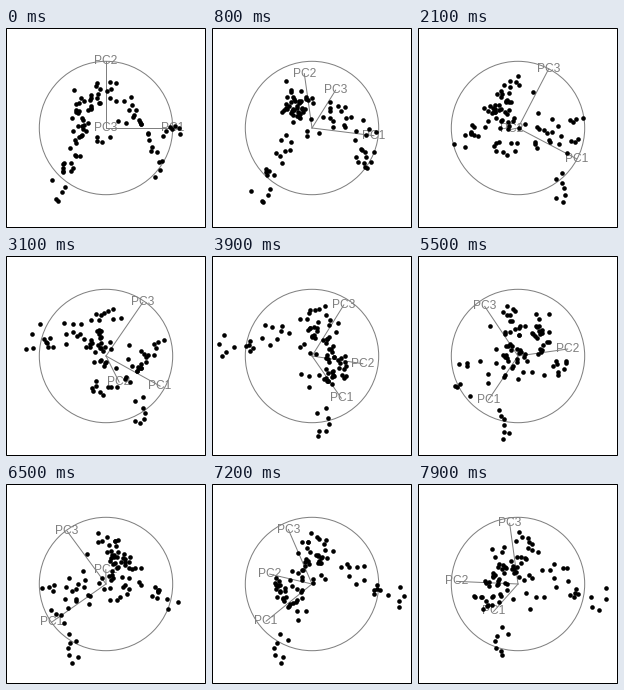
A matplotlib script that plays this animation: 200x200 px, repeating every 8000 ms.

```python
import numpy as np
import matplotlib.pyplot as plt
from matplotlib.animation import FuncAnimation
from matplotlib.patches import Circle, Rectangle

SIZE, DPI = 200, 100
PT = 72 / DPI          # one pixel in points
CENTER, RADIUS = 100, 66.7
FRAMES, INTERVAL = 80, 100
GRAY = "#7f7f7f"

# Tour legs: tilt direction on screen (degrees), tilt angle (rad), steps.
# The view rests for one step between legs.
LEGS = [
    (58, 1.19, 13), (108, 1.20, 13), (224, 0.21, 3), (206, 1.55, 14),
    (158, 1.31, 13), (186, 1.30, 13), (212, 0.35, 4),
]

# The observations follow a horseshoe with a side arm and a sparse core.
HORSESHOE = [
    (-48, -78, -31), (-44, -44, -40), (-36, -36, 2), (-34, -22, 4),
    (-25, -3, 35), (-22, 2, 30), (-34, 16, 14), (-24, 32, 16),
    (-14, 26, 2), (-18, 22, 8), (-4, 45, -24), (14, 37, -17),
    (26, 16, 12), (34, 5, 4), (49, -19, 18), (58, -48, 18),
]
SIDE_ARM = [(58, -9, -20), (73, 1, -48)]
CORE = [(-12, -18, 18), (17, 4, 6)]


def strand(rng, keys, n, spread):
    """n jittered points along a path, equally many on each leg."""
    keys = np.array(keys, float)
    t = np.linspace(0, len(keys) - 1, n)
    path = [np.interp(t, np.arange(len(keys)), k) for k in keys.T]
    jitter = np.clip(rng.normal(size=(n, 3)), -1.8, 1.8)
    return np.column_stack(path) + jitter * spread


def tilt(direction, angle):
    """Rotate the view by an angle, about an axis lying in the screen."""
    a = np.radians(direction)
    u = np.array([np.cos(a), np.sin(a)])
    c, s = np.cos(angle), np.sin(angle)
    m = np.eye(3)
    m[:2, :2] -= (1 - c) * np.outer(u, u)
    m[:2, 2] = s * u
    m[2, :2] = -s * u
    m[2, 2] = c
    return m


def view(frame):
    basis = np.eye(3)
    for direction, angle, steps in LEGS:
        part = min(frame, steps) / steps
        basis = tilt(direction, angle * part) @ basis
        frame -= steps + 1
        if frame <= 0:
            break
    return basis[:2]


def to_screen(xy):
    return CENTER + xy[0], CENTER - xy[1]


rng = np.random.default_rng(12)
data = np.vstack([
    strand(rng, HORSESHOE, 82, (5, 4.5, 11)),
    strand(rng, SIDE_ARM, 7, (2, 4, 4)),
    strand(rng, CORE, 6, (3, 5, 14)),
])

fig = plt.figure(figsize=(SIZE / DPI, SIZE / DPI), dpi=DPI, facecolor="white")
ax = fig.add_axes([0, 0, 1, 1])
ax.set_xlim(0, SIZE)
ax.set_ylim(SIZE, 0)
ax.axis("off")

ax.add_patch(Rectangle((0.5, 0.5), SIZE - 1, SIZE - 1, fill=False,
                       ec="black", lw=PT, snap=False, clip_on=False))
ax.add_patch(Circle((CENTER, CENTER), RADIUS, fill=False, ec=GRAY, lw=PT))
spokes = [ax.plot([], [], color=GRAY, lw=PT, zorder=2)[0] for _ in range(3)]
labels = [ax.text(0, 0, f"PC{i + 1}", color=GRAY, fontsize=12 * PT,
                  family="Liberation Sans", ha="center", va="center", zorder=3)
          for i in range(3)]
dots, = ax.plot([], [], "o", color="black", ms=4.6 * PT, mew=0, zorder=4)


def draw(frame):
    basis = view(frame)
    for spoke, label, end in zip(spokes, labels, basis.T):
        x, y = to_screen(end * RADIUS)
        spoke.set_data([CENTER, x], [CENTER, y])
        label.set_position((x, y))
    dots.set_data(*to_screen(basis @ data.T))
    return [*spokes, *labels, dots]


anim = FuncAnimation(fig, draw, frames=FRAMES, interval=INTERVAL,
                     repeat=True, repeat_delay=0)
plt.show()
```
